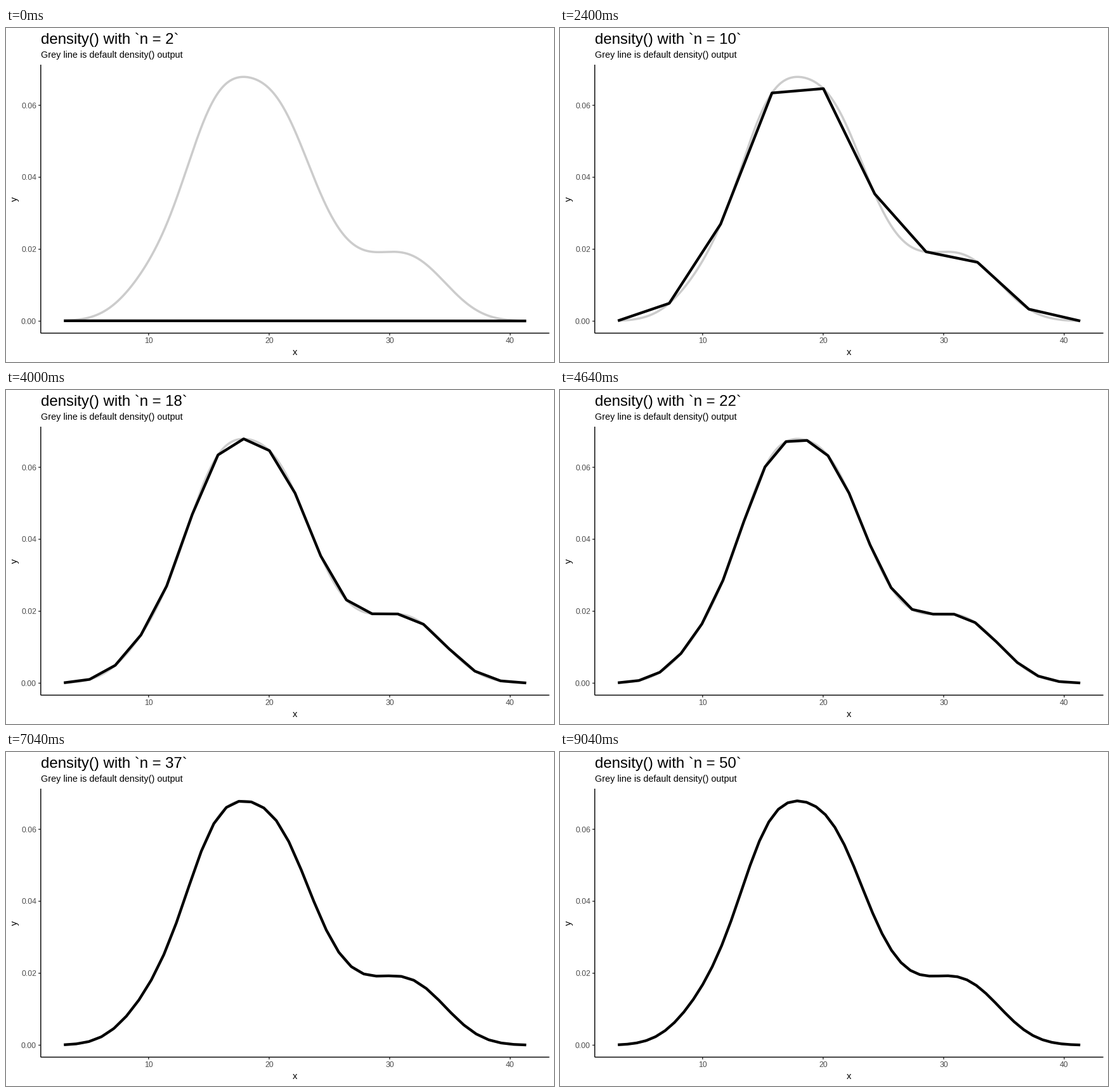
Recreate the animation shown at these times as a matplotlib script. Size 864 px wide and 528 px high, loop 9600 ms.

```python
import numpy as np
import matplotlib.pyplot as plt
from matplotlib.animation import FuncAnimation

plt.rcParams["font.family"] = "Liberation Sans"

WIDTH, HEIGHT, DPI = 864, 528, 96
FRAMES, INTERVAL = 120, 80
LEFT, RIGHT, TOP, BOTTOM = 54.8, 856.67, 58.0, 482.4
PT = 72 / DPI  # points per pixel

SAMPLE = np.array([
    21, 21, 22.8, 21.4, 18.7, 18.1, 14.3, 24.4, 22.8, 19.2, 17.8, 16.4,
    17.3, 15.2, 10.4, 10.4, 14.7, 32.4, 30.4, 33.9, 21.5, 15.5, 15.2, 13.3,
    19.2, 27.3, 26, 30.4, 15.8, 19.7, 15, 21.4])


def bandwidth(data):
    q1, q3 = np.percentile(data, [25, 75])
    return 0.9 * min(data.std(ddof=1), (q3 - q1) / 1.34) * len(data) ** -0.2


BW = bandwidth(SAMPLE)
X_MIN, X_MAX = SAMPLE.min() - 3 * BW, SAMPLE.max() + 3 * BW


def density(n):
    """Gaussian kernel density at n evenly spaced points."""
    x = np.linspace(X_MIN, X_MAX, n)
    z = (x[:, None] - SAMPLE) / BW
    return x, np.exp(-z ** 2 / 2).mean(axis=1) / (BW * np.sqrt(2 * np.pi))


full_x, full_y = density(512)


def rescale(value, low, high, start, end):
    """Map data to pixels, with 5 % padding on both sides of the range."""
    pad = 0.05 * (high - low)
    return start + (value - low + pad) / (high - low + 2 * pad) * (end - start)


def to_px(x, y):
    return (rescale(x, X_MIN, X_MAX, LEFT, RIGHT),
            rescale(y, full_y.min(), full_y.max(), BOTTOM, TOP))


fig = plt.figure(figsize=(WIDTH / DPI, HEIGHT / DPI), dpi=DPI, facecolor="white")
ax = fig.add_axes([0, 0, 1, 1])
ax.set_xlim(0, WIDTH)
ax.set_ylim(HEIGHT, 0)
ax.axis("off")


def stroke(xs, ys, color, width, z):
    line, = ax.plot(xs, ys, color=color, lw=width * PT, zorder=z, snap=False,
                    solid_capstyle="butt", solid_joinstyle="round")
    return line


def label(x, y, text, size, color="black", **kw):
    return ax.text(x, y, text, fontsize=size * PT, color=color,
                   **{"va": "baseline", **kw})


stroke(*to_px(full_x, full_y), "#cccccc", 3.5, 1)
curve = stroke([], [], "black", 4.27, 2)

stroke([LEFT, LEFT], [TOP, BOTTOM], "black", 1.42, 4)
stroke([LEFT, RIGHT], [BOTTOM, BOTTOM], "black", 1.42, 4)

TICK = 3.67
for value in (10, 20, 30, 40):
    px, _ = to_px(value, 0)
    stroke([px, px], [BOTTOM, BOTTOM + TICK], "#333333", 1.42, 3)
    label(px, 498, str(value), 12.1, "#4d4d4d", ha="center")
for value in (0, 0.02, 0.04, 0.06):
    _, py = to_px(10, value)
    stroke([LEFT - TICK, LEFT], [py, py], "#333333", 1.42, 3)
    label(48, py + 4.3, f"{value:.2f}", 12.1, "#4d4d4d", ha="right")

title = label(LEFT, 25, "", 24)
label(LEFT, 47, "Grey line is default density() output", 14.4)
label((LEFT + RIGHT) / 2, 517, "x", 14.67, ha="center")
label(18, (TOP + BOTTOM) / 2, "y", 14.67, rotation=90, ha="right",
      va="center").set_x(21.3)


def state(frame):
    """Return the point count of the curve and the one named in the title."""
    if frame < 8:
        return 2, 2
    if frame < 38:
        step, phase = divmod(frame - 8, 3)
        n = 3 + step
    else:
        step, phase = divmod(min(frame, 113) - 38, 2)
        n = 13 + step
    # The title follows one frame after the curve.
    return n, n - (phase == 0)


def update(frame):
    n, shown = state(frame)
    curve.set_data(*to_px(*density(n)))
    title.set_text(f"density() with `n = {shown}`")
    return curve, title


anim = FuncAnimation(fig, update, frames=FRAMES, interval=INTERVAL,
                     repeat=True, repeat_delay=0, blit=False)
plt.show()
```
